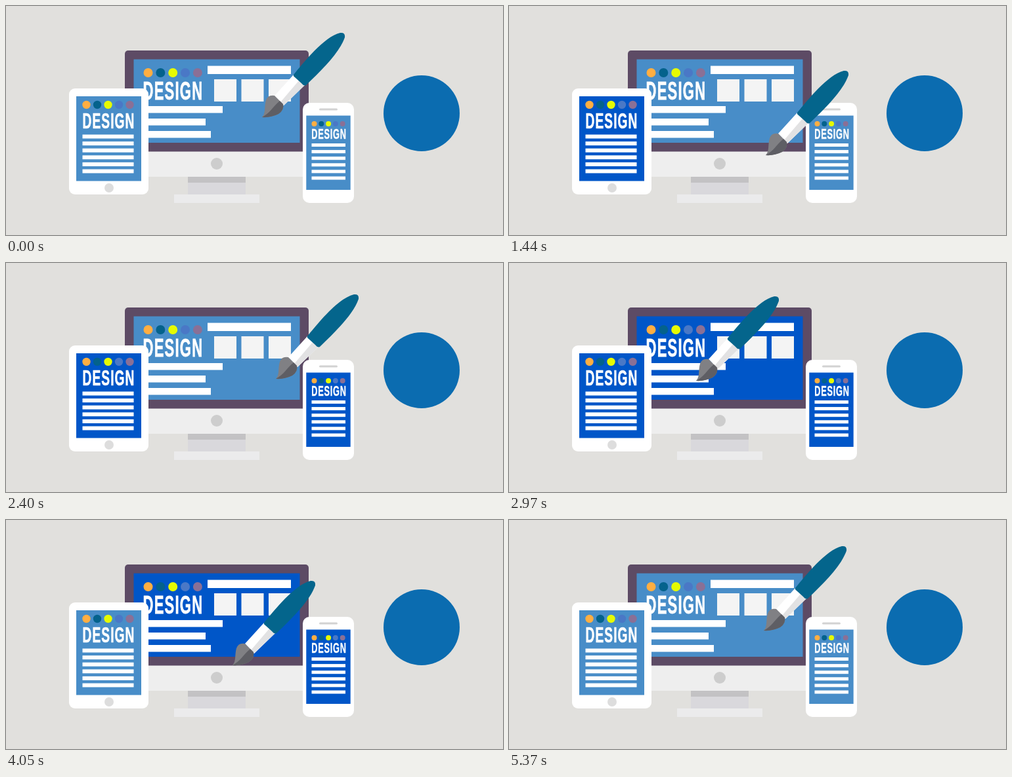
Animation of 757 by 350 pixels, one loop 5400 ms. Source, as an HTML page:

```html
<!DOCTYPE html>
<html lang="en">
<head>
<meta charset="utf-8">
<title>Responsive design</title>
<style>
  html, body { margin: 0; width: 100%; height: 100%; overflow: hidden; background: #e1e0dd; }
  svg { display: block; width: 757px; height: 350px; }
  .word { font: bold 39px "Liberation Sans", Arial, sans-serif; letter-spacing: 2.2px; fill: #fff; stroke: #fff; stroke-width: .8; }
</style>
</head>
<body>
<svg id="stage" viewBox="0 0 757 350" xmlns="http://www.w3.org/2000/svg"></svg>
<script>
const LOOP = 5400, HALF = LOOP / 2, STEP = 30, FADE = 150;
const LIGHT = [72, 141, 200], DARK = [0, 86, 200];
const DOTS = ['#ffae42', '#04628c', '#e6fb00', '#4a78c6', '#8a7096'];

const rect = (x, y, w, h, fill, rx = 0, id = '') =>
  `<rect ${id && `id="${id}"`} x="${x}" y="${y}" width="${w}" height="${h}" rx="${rx}" fill="${fill}"/>`;
const circle = (x, y, r, fill) => `<circle cx="${x}" cy="${y}" r="${r}" fill="${fill}"/>`;
const path = (d, fill) => `<path d="${d}" fill="${fill}"/>`;
const dots = (x, y, gap, r) => DOTS.map((c, i) => circle(x + i * gap, y, r, c)).join('');
const lines = (x, y, w, h, gap, count) =>
  Array.from({ length: count }, (_, i) => rect(x, y + i * gap, w, h, '#fff')).join('');
// Condensed lettering shared by the three screens.
const word = (x, y, size) =>
  `<text class="word" transform="translate(${x} ${y}) scale(${0.565 * size} ${size})">DESIGN</text>`;

const monitor =
  rect(277, 260, 88, 29, '#d9d8dc') + rect(277, 260, 88, 10, '#c3c2c4') +
  rect(256, 288, 130, 13, '#ebebec') +
  rect(181, 68, 280, 170, '#5d4b65', 5) +
  path('M181 222.5H461V256Q461 261 456 261H186Q181 261 181 256Z', '#eeeeee') +
  circle(321, 241, 9, '#cdcdcd') +
  rect(194.5, 81.5, 253, 127.5, '#488dc8', 0, 'monitor') +
  dots(216.5, 102, 18.85, 7) + word(208.5, 143.2, 1) +
  rect(307, 91.5, 127, 12.5, '#fff') +
  [317, 358.5, 400].map(x => rect(x, 112, 34, 34, '#f4f4f4')).join('') +
  [120, 94, 102].map((w, i) => rect(210, 153 + i * 19, w, 10.5, '#fff')).join('');

const tablet =
  rect(96, 126, 121, 162, '#fff', 9) + circle(157, 278, 7, '#dddddd') +
  rect(107, 138, 99, 129.5, '#488dc8', 0, 'tablet') +
  dots(122.5, 151, 16.5, 6.2) + word(116.5, 186.5, 0.87) +
  lines(116.5, 196.5, 78, 6, 10.6, 6);

const phone =
  rect(452, 148, 78, 153, '#fff', 10) + rect(477, 156.5, 28, 3, '#d2d2d2', 1.5) +
  rect(457.3, 167.5, 67.4, 113.5, '#488dc8', 0, 'phone') +
  dots(469.5, 180, 10.8, 4) + word(465.3, 203, 0.58) +
  lines(465.5, 210, 51.5, 5, 10.1, 6);

// The brush is drawn with its tip at the origin.
const brush = '<g id="brush">' +
  path('M18-32L47-64L64-48L32-17Z', '#fff') +
  path('M27-22L56-56L64-48L32-17Z', '#e2e2e3') +
  path('M47-64C62-82 93-122 118-128Q126-129 125-121C117-98 92-73 66-48Q63-46 59-51L49-60Q46-62 47-64Z', '#04658c') +
  path('M-1 1C5-5 2-15 5-25Q8-34 18-32L31-19Q33-10 24-4Q12 2-1 1Z', '#808084') +
  path('M-1 1C12-6 14-14 26-24L31-19Q33-10 24-4Q12 2-1 1Z', '#5e5e64') + '</g>';

const logo = circle(633, 164, 58, '#0b6cb0');

const stage = document.getElementById('stage');
stage.innerHTML = monitor + tablet + phone + logo + brush;
const brushNode = document.getElementById('brush');

// Tip positions [time, x, y] for one round over tablet, phone and monitor.
const keys = [
  [0, 391, 169], [150, 344, 171], [270, 286, 179], [450, 206, 183], [570, 166, 185],
  [660, 156, 188], [720, 156, 209], [840, 162, 228], [1000, 184, 212], [1140, 236, 209],
  [1290, 315, 219], [1350, 346, 221], [1440, 392, 227], [1600, 455, 240], [1740, 478, 246],
  [1900, 470, 256], [2080, 472, 234], [2280, 440, 187], [2400, 412, 176], [2520, 397, 160],
  [2670, 389, 168]
];
const keyAt = i => {
  const n = keys.length, [t, x, y] = keys[(i + n) % n];
  return [t + Math.floor(i / n) * HALF, x, y];
};

// Smooth cyclic curve through the keys.
function tipAt(t) {
  const i = keys.findLastIndex(k => k[0] <= t);
  const [a, b, c, d] = [i - 1, i, i + 1, i + 2].map(keyAt);
  const span = c[0] - b[0], u = (t - b[0]) / span, v = 1 - u;
  return [1, 2].map(k => {
    const m0 = (c[k] - a[k]) / (c[0] - a[0]) * span;
    const m1 = (d[k] - b[k]) / (d[0] - b[0]) * span;
    return b[k] * (1 + 2 * u) * v * v + m0 * u * v * v + c[k] * u * u * (3 - 2 * u) - m1 * u * u * v;
  });
}

const screens = [['tablet', 750], ['phone', 1750], ['monitor', 2480]]
  .map(([id, start]) => ({ node: document.getElementById(id), start }));
const ramp = (t, start) => Math.min(1, Math.max(0, (t - start) / FADE));

function render(now) {
  const t = Math.floor((now % LOOP) / STEP) * STEP;
  for (const { node, start } of screens) {
    const k = ramp(t, start) - ramp(t, start + HALF);
    node.setAttribute('fill', `rgb(${LIGHT.map((c, i) => Math.round(c + (DARK[i] - c) * k))})`);
  }
  brushNode.setAttribute('transform', `translate(${tipAt(t % HALF)})`);
}

const begin = performance.now();
function tick() {
  render(performance.now() - begin);
  requestAnimationFrame(tick);
}
tick();
</script>
</body>
</html>
```
